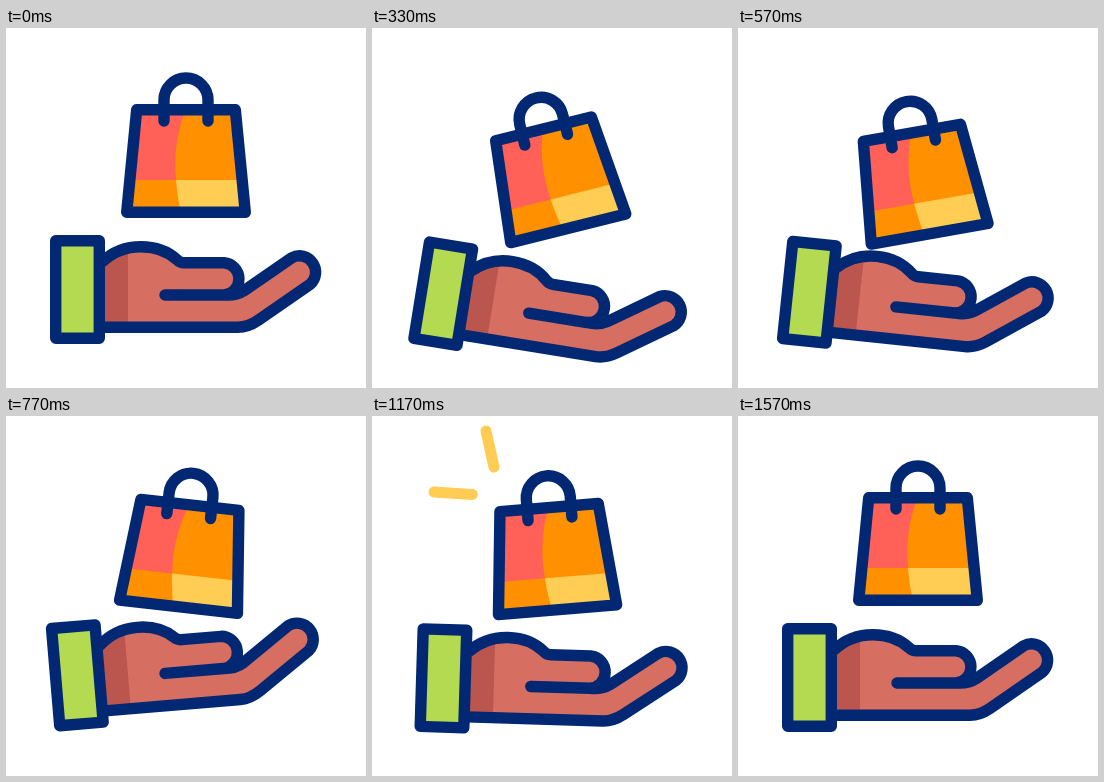
Animation of 360x360 px, one loop 2000 ms. Source, as an HTML page:

```html
<!DOCTYPE html>
<html lang="en">
<head>
<meta charset="utf-8">
<title>Shopping bag in hand</title>
<style>
  html, body { margin: 0; width: 100%; height: 100%; overflow: hidden; background: #fff; }
  svg { display: block; width: 100%; height: 100%; }
  .line { stroke: #022873; stroke-width: 11.4; stroke-linecap: round; stroke-linejoin: round; }
  .spark { stroke: #ffcd54; stroke-width: 11; stroke-linecap: round; }
</style>
</head>
<body>
<svg viewBox="0 0 360 360" fill="none">
  <defs>
    <clipPath id="bagShape"><path d="M131 82H229L239 184H121Z"/></clipPath>
  </defs>
  <g id="hand">
    <path fill="#d66e61" d="M96 234Q112 218.700 135 218.700Q157 218.700 171 231.700Q174 234.700 178 234.700H218A16.300 16.300 0 0 1 234.300 251V266L285.800 229.700A16.300 16.300 0 0 1 304.200 256.300L252.200 292.300Q242 299.300 232 299.300H96Z"/>
    <path fill="#bb564e" d="M96 234Q108 223 122 220V299H96Z"/>
    <path class="line" d="M96 234Q112 218.700 135 218.700Q157 218.700 171 231.700Q174 234.700 178 234.700H218A16.200 16.200 0 0 1 218 267H159M218 267Q230 268 238 262.800L285.800 229.700A16.300 16.300 0 0 1 304.200 256.300L252.200 292.300Q242 299.300 232 299.300H96"/>
    <path class="line" fill="#b3da51" d="M49.700 212.700H93.300V310.300H49.700Z"/>
  </g>
  <g id="bag">
    <g clip-path="url(#bagShape)">
      <path fill="#ff9100" d="M115 76H245V190H115Z"/>
      <path fill="#ff6057" d="M115 76H182Q166 112 170 152H115Z"/>
      <path fill="#ffcd54" d="M170 152H245V190H176Q171.500 172 170 152Z"/>
    </g>
    <path class="line" d="M130.700 81.800H229.300L239.300 184.300H120.700Z"/>
    <path class="line" d="M158 93V72A22 22 0 0 1 202 72V93"/>
  </g>
  <line class="spark" id="sparkTop"/>
  <line class="spark" id="sparkSide"/>
</svg>
<script>
  const LOOP = 2000, FPS = 30;
  const el = id => document.getElementById(id);
  const hand = el('hand'), bag = el('bag');

  // Keys are [step, value]; values swing between them on a cosine.
  const handTurn = [[0, 0], [13.4, 10.8], [23, -4.8], [33.5, 1.8], [47, 0]];
  const bagTurn = [[0, 0], [13, -16], [25, 8], [36, -5], [47, 0]];
  const bagDrop = [[0, 0], [15, 24], [27.5, 0], [36, 10], [47, 0]];

  const sparks = [
    { node: el('sparkTop'), from: [124, 60], to: [114, 15] },
    { node: el('sparkSide'), from: [110, 79], to: [62, 76] }
  ];

  const clamp = x => Math.min(1, Math.max(0, x));

  function swing(keys, step) {
    for (let i = 1; i < keys.length; i++) {
      const [s0, v0] = keys[i - 1], [s1, v1] = keys[i];
      if (step <= s1) {
        const p = (step - s0) / (s1 - s0);
        return v0 + (v1 - v0) * (1 - Math.cos(Math.PI * p)) / 2;
      }
    }
    return keys[keys.length - 1][1];
  }

  function drawSpark({ node, from, to }, step) {
    const head = clamp((step - 27) / 7), tail = clamp((step - 33.6) / 7);
    const at = (axis, p) => from[axis] + (to[axis] - from[axis]) * p;
    node.setAttribute('x1', at(0, tail));
    node.setAttribute('y1', at(1, tail));
    node.setAttribute('x2', at(0, head));
    node.setAttribute('y2', at(1, head));
    node.setAttribute('visibility', head > tail ? 'visible' : 'hidden');
  }

  function draw(ms) {
    const step = Math.floor((ms % LOOP + 4) * FPS / 1000);
    hand.setAttribute('transform', `rotate(${swing(handTurn, step)} 45 262)`);
    bag.setAttribute('transform',
      `translate(0 ${swing(bagDrop, step)}) rotate(${swing(bagTurn, step)} 180 117)`);
    sparks.forEach(s => drawSpark(s, step));
  }

  let start;
  function tick(now) {
    start ??= now;
    draw(now - start);
    requestAnimationFrame(tick);
  }
  draw(0);
  requestAnimationFrame(tick);
</script>
</body>
</html>
```
